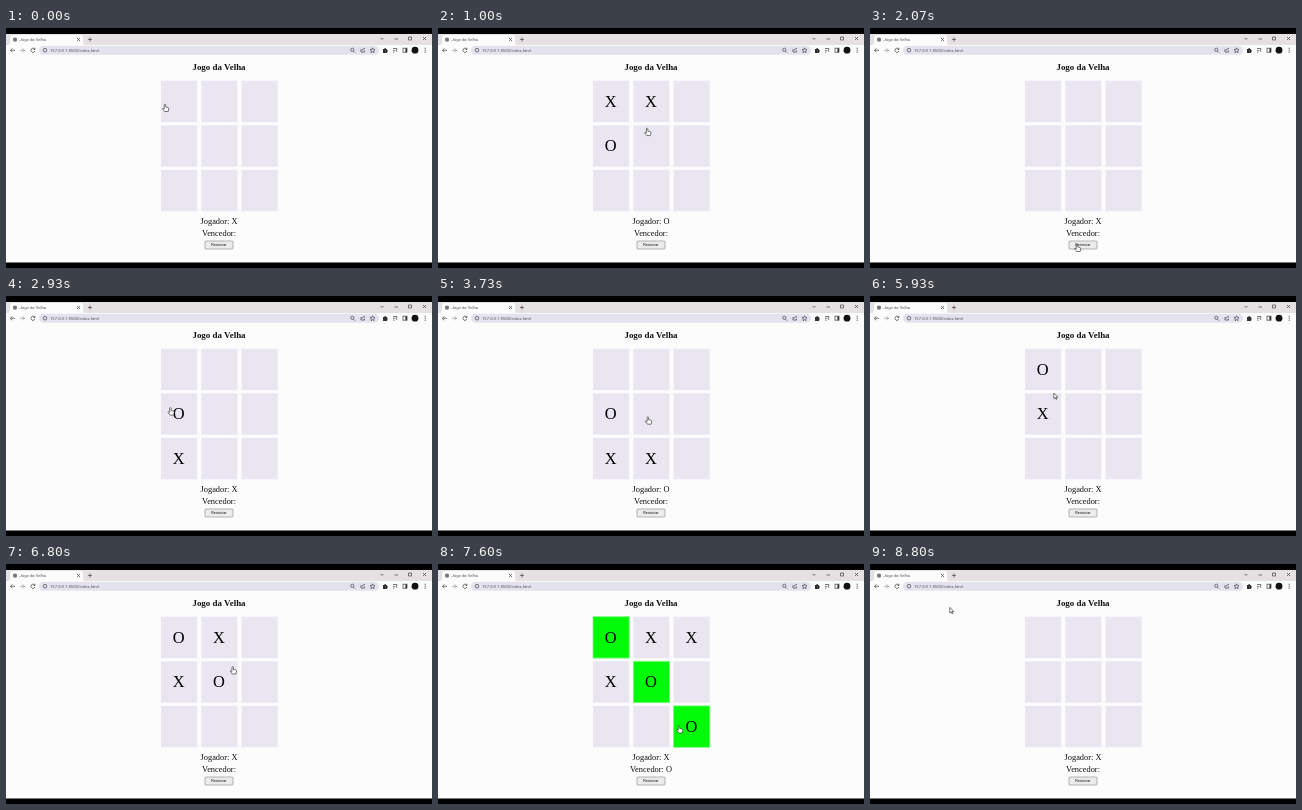
Animation of 426x240 px, one loop 8.87 s. Source, as an HTML page:

```html
<!DOCTYPE html>
<html lang="pt">
<head>
<meta charset="utf-8">
<title>Jogo da Velha</title>
<style>
  html, body { margin: 0; width: 100%; height: 100%; overflow: hidden; background: #000; }
  svg { display: block; width: 100vw; height: 100vh; }
  text { fill: #111; }
  .serif { font-family: "Liberation Serif", serif; text-anchor: middle; }
  .ui { font-family: Roboto, "Open Sans", sans-serif; font-size: 4.2px; fill: #555; }
  .label { font-size: 8.4px; }
  .mark { font-size: 16.4px; fill: #000; }
  .cell { fill: #e9e6f2; }
  .cell.win { fill: #00fa08; stroke: #7dfb82; stroke-width: .8; }
  .icon { fill: none; stroke: #555; stroke-width: .8; }
</style>
</head>
<body>
<svg viewBox="0 0 426 240" preserveAspectRatio="none">
  <rect width="426" height="240" fill="#000"/>
  <rect y="6" width="426" height="228.5" fill="#fcfcfd"/>

  <rect y="6" width="426" height="11" fill="#e5e0e2"/>
  <path d="M2 17Q4 17 4 14V9Q4 7 6 7H75Q77 7 77 9V14Q77 17 79 17Z" fill="#fcfcfd"/>
  <circle cx="9" cy="11.7" r="2.1" fill="#777"/>
  <text class="ui" x="13.5" y="13.3">Jogo da Velha</text>
  <path class="icon" d="M71 10l3 3m0-3l-3 3M82 11.5h4m-2-2v4"/>
  <path class="icon" d="M374.5 10l1.5 1.5 1.5-1.5M388.5 11h3.5M402.5 9h3v3h-3zM417 9l3 3m0-3l-3 3"/>

  <rect x="33" y="17.8" width="340" height="9" rx="4.5" fill="#e5e2ef"/>
  <path class="icon" d="M9 22.3H4.5m2-2l-2 2 2 2"/>
  <path class="icon" stroke-opacity=".55" d="M14 22.3h4.5m-2-2l2 2-2 2"/>
  <path class="icon" d="M28.6 20.9a2.1 2.1 0 1 0 .4 2M29 19.8v1.6h-1.7"/>
  <circle class="icon" cx="39" cy="22.2" r="1.8"/>
  <text class="ui" x="44" y="23.9">127.0.0.1:5500/index.html</text>
  <path class="icon" d="M347.5 23.2l1.4 1.4M355 21v3h3.5v-1.5M356 22.5q.5-2 3-2M366.5 19.8l.7 1.6 1.8.2-1.3 1.2.3 1.8-1.5-.9-1.5.9.3-1.8-1.3-1.2 1.8-.2z"/>
  <circle class="icon" cx="346.3" cy="21.8" r="1.6"/>
  <path d="M377 21h1.2a.9 .9 0 0 1 1.8 0h1.2v1.3a.9 .9 0 0 1 0 1.6v1H377z" fill="#333"/>
  <path class="icon" d="M387 20.5h4m-4 1.8h2.4m-2.4 1.8h1.5M390.7 20.5v3.3"/>
  <rect class="icon" x="397" y="20.2" width="4" height="4"/>
  <path d="M399.4 20.2h1.6v4h-1.6z" fill="#333"/>
  <circle cx="409" cy="22.2" r="3.4" fill="#111"/>
  <path d="M418.7 19.7h1v1h-1zm0 2h1v1h-1zm0 2h1v1h-1z" fill="#333"/>

  <text class="serif" x="213" y="42.3" font-size="8.95" font-weight="bold">Jogo da Velha</text>
  <g id="board"></g>
  <text class="serif label" id="player" x="213" y="195.5"></text>
  <text class="serif label" id="winner" x="213" y="208"></text>
  <rect x="199" y="213" width="28" height="8" rx=".8" fill="#ececec" stroke="#888" stroke-width=".6"/>
  <text class="ui" x="213" y="218.4" text-anchor="middle" style="font-size:4px;fill:#111">Reiniciar</text>

  <g id="cursor" fill="#fff" stroke="#222" stroke-width=".6" stroke-linejoin="round">
    <path id="hand" d="M-.7 .5Q0-.5 .7 .5V3L3 3.5Q4 3.8 3.8 5L3.2 7.5H-.4L-2.5 4.6Q-2.2 3.7-.7 4.8Z"/>
    <path id="arrow" d="M0 0V5.6L1.3 4.4 2.2 6.4 3.1 6 2.2 4.1H4Z"/>
  </g>
</svg>
<script>
const LOOP = 8870, STEP = LOOP / 133;
const RESET = 'reset';
// time, x, y, and the cell or button clicked on arrival
const path = [
  [0, 159, 76], [270, 175, 80, 0], [600, 175, 112, 3], [870, 208, 80, 1],
  [1130, 210, 116, 4], [1470, 250, 78, 2], [2000, 207, 216, RESET], [2130, 207, 216],
  [2500, 171, 164, 6], [2790, 165, 114, 3], [2930, 164, 110], [3330, 208, 162, 7],
  [3730, 210, 118, 4], [4130, 250, 162, 8], [4600, 224, 204], [4870, 210, 216, RESET],
  [5270, 170, 120, 3], [5670, 170, 78, 0], [5930, 186, 100], [6270, 208, 78, 1],
  [6600, 212, 118, 4], [6930, 250, 78, 2], [7330, 248, 158, 8], [7600, 240, 162],
  [8130, 210, 216, RESET], [8270, 210, 216], [8800, 75, 37]
];
const lines = ['012', '345', '678', '036', '147', '258', '048', '246'].map(s => [...s].map(Number));
const $ = id => document.getElementById(id);

function add(tag, attrs) {
  const el = document.createElementNS('http://www.w3.org/2000/svg', tag);
  for (const key in attrs) el.setAttribute(key, attrs[key]);
  return $('board').appendChild(el);
}

const cells = Array.from({ length: 9 }, (_, i) => {
  const x = 155 + i % 3 * 40.3, y = 52.7 + Math.floor(i / 3) * 44.6;
  return {
    x, y,
    box: add('rect', { x, y, width: 36.2, height: 41.4, class: 'cell' }),
    mark: add('text', { x: x + 17.7, y: y + 26, class: 'serif mark' })
  };
});

function gameAt(time) {
  let marks = [], turn = 'X';
  for (const [at, , , action] of path) {
    if (at > time) break;
    if (action === RESET) {
      marks = [];
      turn = 'X';
    } else if (action !== undefined) {
      marks[action] = turn;
      turn = turn === 'X' ? 'O' : 'X';
    }
  }
  const line = lines.find(([a, b, c]) => marks[a] && marks[a] === marks[b] && marks[a] === marks[c]);
  return { marks, turn, line };
}

function cursorAt(time) {
  const next = path.findIndex(p => p[0] > time);
  if (next < 0) return path[path.length - 1].slice(1, 3);
  const [t0, x0, y0] = path[next - 1], [t1, x1, y1] = path[next];
  const u = (time - t0) / (t1 - t0), k = u * u * (3 - 2 * u);
  return [x0 + (x1 - x0) * k, y0 + (y1 - y0) * k];
}

const inside = (x, y, left, top, w, h) => x >= left && x <= left + w && y >= top && y <= top + h;

function draw(now) {
  const time = Math.ceil(Math.floor(now % LOOP / STEP) * STEP / 10) * 10;
  const { marks, turn, line } = gameAt(time);
  cells.forEach(({ box, mark }, i) => {
    mark.textContent = marks[i] || '';
    box.classList.toggle('win', !!line && line.includes(i));
  });
  $('player').textContent = 'Jogador: ' + turn;
  $('winner').textContent = 'Vencedor:' + (line ? ' ' + marks[line[0]] : '');

  const [x, y] = cursorAt(time);
  const pointing = inside(x, y, 199, 213, 28, 8) || cells.some(c => inside(x, y, c.x, c.y, 36.2, 41.4));
  $('cursor').setAttribute('transform', `translate(${x} ${y})`);
  $('hand').style.display = pointing ? '' : 'none';
  $('arrow').style.display = pointing ? 'none' : '';
}

const start = performance.now();
function tick() {
  draw(performance.now() - start);
  requestAnimationFrame(tick);
}
tick();
</script>
</body>
</html>
```
